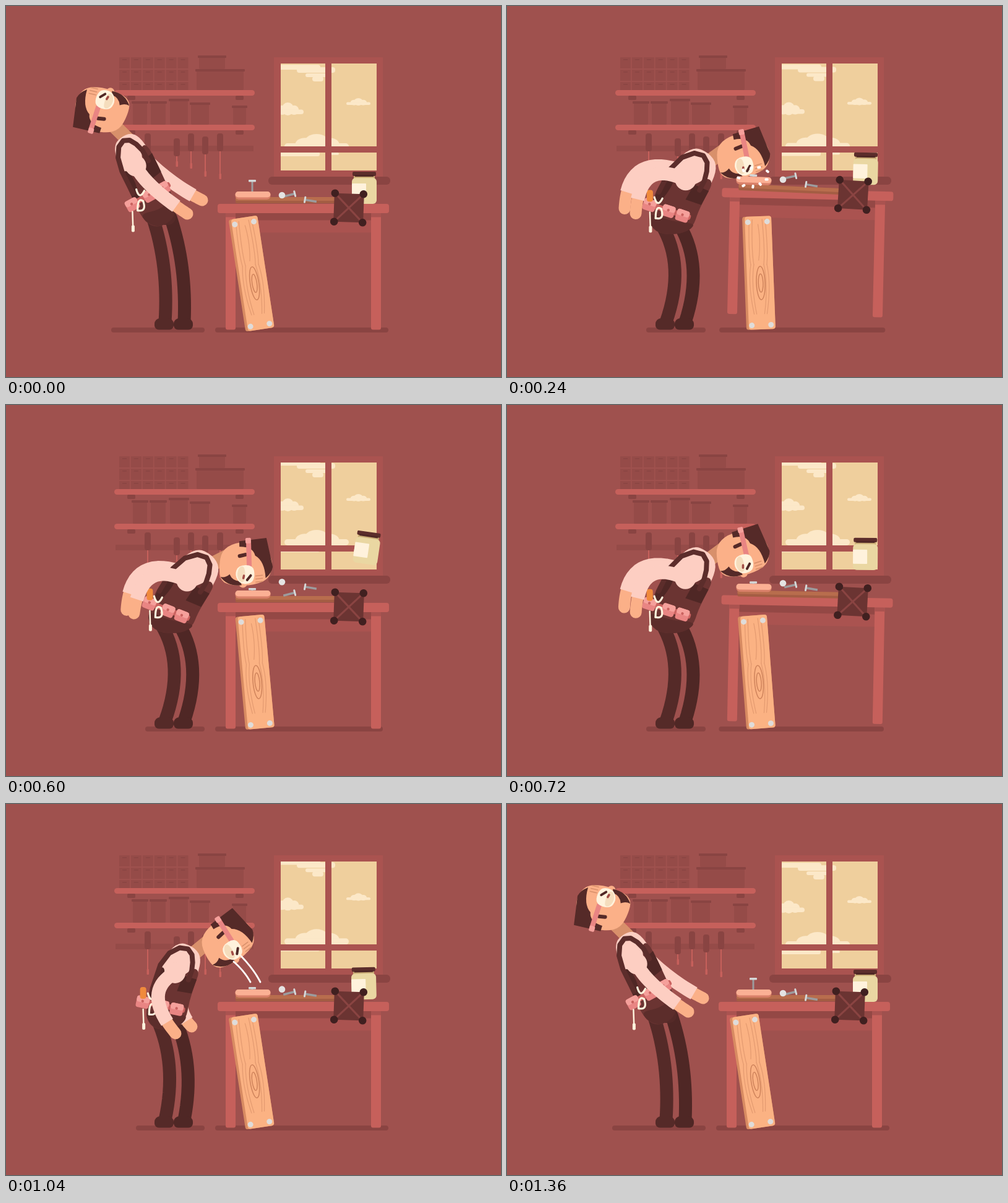
Write an HTML page with a canvas that moves like this. It is 800x600 px and loops after 1400 ms.

```html
<!DOCTYPE html>
<html lang="en">
<head>
<meta charset="utf-8">
<title>Workshop</title>
<style>
html, body { margin: 0; width: 100%; height: 100%; overflow: hidden; background: #9f514e; }
canvas { display: block; width: 800px; height: 600px; }
</style>
</head>
<body>
<canvas id="stage" width="800" height="600"></canvas>
<script>
const ctx = document.getElementById('stage').getContext('2d');
const LOOP = 1400, STEP = 40, RAD = Math.PI / 180;
const SLAM = 200, SLAM2 = 640;
const C = {
  bg: '#9f514e', dim: '#954b48', dimmer: '#894442', red: '#c6605b', rail: '#aa5350',
  shade: '#8a4442', skin: '#fbb088', tan: '#d8906b', shirt: '#fdcec2', hair: '#552a28',
  apron: '#6b3432', dark: '#4f2725', strap: '#5c2d2b', belt: '#e98583', beltHi: '#f5a09b',
  steel: '#d5d8d8', steelLow: '#9c9b9d', cream: '#fff2dc', sky: '#efcf9d', cloud: '#fce8c8'
};

// ---- drawing helpers
function box(x, y, w, h, color, r = 0) {
  ctx.fillStyle = color;
  ctx.beginPath();
  ctx.roundRect(x, y, w, h, r);
  ctx.fill();
}
function dot(x, y, r, color, ry = r) {
  ctx.fillStyle = color;
  ctx.beginPath();
  ctx.ellipse(x, y, r, ry, 0, 0, 7);
  ctx.fill();
}
function line(pts, w, color, cap = 'round') {
  ctx.strokeStyle = color;
  ctx.lineWidth = w;
  ctx.lineCap = cap;
  ctx.lineJoin = 'round';
  ctx.beginPath();
  pts.forEach(p => ctx.lineTo(...p));
  ctx.stroke();
}
function poly(pts, color) {
  ctx.fillStyle = color;
  ctx.beginPath();
  pts.forEach(p => ctx.lineTo(...p));
  ctx.fill();
}
// closed smooth shape through edge midpoints
function blob(pts, color) {
  const n = pts.length, mid = i => mix(pts[i % n], pts[(i + 1) % n], 0.5);
  ctx.fillStyle = color;
  ctx.beginPath();
  ctx.moveTo(...mid(0));
  for (let i = 1; i <= n; i++) ctx.quadraticCurveTo(...pts[i % n], ...mid(i));
  ctx.fill();
}
function path(d, color) {
  ctx.fillStyle = color;
  ctx.fill(new Path2D(d));
}
function group(x, y, deg, draw) {
  ctx.save();
  ctx.translate(x, y);
  ctx.rotate(deg * RAD);
  draw();
  ctx.restore();
}
const quad = (a, b, c, u) => (1 - u) * (1 - u) * a + 2 * u * (1 - u) * b + u * u * c;
function bend(x0, y0, x1, y1, x2, y2, from = 0, to = 1) {
  return Array.from({ length: 17 }, (_, i) => {
    const u = from + (to - from) * i / 16;
    return [quad(x0, x1, x2, u), quad(y0, y1, y2, u)];
  });
}

// ---- timing helpers
const mix = (a, b, k) => a.map((v, i) => v + (b[i] - v) * k);
const part = (t, start, dur) => Math.min(1, Math.max(0, (t - start) / dur));
const ease = (t, start, end) => { const u = part(t, start, end - start); return u * u * (3 - 2 * u); };
// rise and fall between start and start + dur; a lower skew peaks sooner
const pop = (t, start, dur, skew = 1) => { const u = part(t, start, dur) ** skew; return 4 * u * (1 - u); };

// ---- poses, in the order the body moves through them
const poses = [
  { head: [155, 168, -72], waist: [245, 328], curve: [214, 268], neck: [196, 212], girth: [1],
    belt: [230, 307, -28], near: [226, 292, 293, 336], far: [264, 288, 317, 314], hip: [237, 342], shade: [170] },
  { head: [357, 222, 58], waist: [258, 340], curve: [262, 280], neck: [303, 238], girth: [1.12],
    belt: [250, 326, 12], near: [218, 304, 274, 371], far: [268, 330, 300, 360], hip: [244, 348], shade: [210] },
  { head: [370, 217, 62], waist: [264, 345], curve: [270, 285], neck: [316, 238], girth: [1.25],
    belt: [257, 329, 12], near: [206, 242, 210, 333], far: [186, 216, 182, 321], hip: [249, 354], shade: [225] },
  { head: [390, 267, 95], waist: [265, 347], curve: [279, 295], neck: [338, 256], girth: [1.28],
    belt: [260, 332, 24], near: [222, 248, 206, 338], far: [206, 228, 198, 334], hip: [251, 355], shade: [225] }
];
// [time, position in the pose list]
const moves = [[0, 0], [80, -0.15], [120, 0.1], [160, 0.9], [SLAM, 2.8], [240, 2.5], [400, 2],
  [600, 2.8], [SLAM2, 3], [740, 2.4], [880, 3], [1040, 1], [1120, 0.22], [1200, 0.02], [1280, 0], [LOOP, 0]];

function poseAt(t) {
  const i = moves.findIndex(m => m[0] > t), [t0, a] = moves[i - 1], [t1, b] = moves[i];
  const s = a + (b - a) * ease(t, t0, t1);
  const n = Math.min(2, Math.max(0, Math.floor(s)));
  const pose = {};
  for (const k in poses[n]) pose[k] = mix(poses[n][k], poses[n + 1][k], s - n);
  pose.head[1] -= 25 * pop(s, 0, 1);
  return pose;
}

// ---- room
function drawShelves() {
  for (let r = 0; r < 3; r++) for (let c = 0; c < 6; c++) {
    const x = 183 + c * 18.9, y = 83 + r * 20;
    box(x, y, 17, r < 2 ? 18 : 13, C.dim);
    box(x + 5, y + 3, 7, 1.5, C.dimmer);
  }
  const jar = (x, y, w, floor) => {
    box(x + 1, y + 3, w - 2, floor - y - 3, C.dim, 2);
    box(x - 1, y, w + 2, 4, C.dimmer, 1);
  };
  jar(311, 80, 44, 102);
  jar(307, 102, 78, 136);
  for (const [x, y, w] of [[204, 154, 25], [233, 154, 26], [264, 150, 31], [298, 156, 31], [366, 161, 23]]) jar(x, y, w, 192);
  for (const y of [136, 192]) {
    box(196, y + 9, 13, 7, C.shade, 2);
    box(371, y + 9, 13, 7, C.shade, 2);
    box(175, y, 227, 9, C.red, 4.5);
  }
  box(177, 226, 223, 9, C.dim);
  for (const [x, y, end] of [[229, 206, 275], [276, 214, 259], [299, 206, 262], [322, 211, 275], [346, 206, 279]]) {
    line([[x, 230], [x, end]], 2, C.red);
    box(x - 1.5, end - 8, 3.5, 9, C.red, 1);
    box(x - 5, y, 10, 29, C.dimmer, 4);
  }
}
function drawWindow(dy) {
  box(433, 83, 176, 194, C.rail);
  ctx.save();
  ctx.beginPath();
  for (const [x, w] of [[444, 72], [526, 73]]) for (const [y, h] of [[93, 134], [237, 29]]) ctx.rect(x, y, w, h);
  ctx.clip();
  box(440, 90, 165, 180, C.sky);
  ctx.translate(0, dy);
  const puff = (x, base, w, h) => {
    dot(x + w * 0.5, base - h * 0.45, w * 0.19, C.cloud, h * 0.55);
    dot(x + w * 0.32, base - h * 0.35, w * 0.15, C.cloud, h * 0.4);
    dot(x + w * 0.7, base - h * 0.35, w * 0.15, C.cloud, h * 0.4);
    box(x, base - h * 0.4, w, h * 0.4, C.cloud, h * 0.2);
  };
  box(436, 95, 72, 8, C.cloud, 4);
  box(470, 99, 62, 9, C.cloud, 4);
  box(484, 109, 35, 6, C.cloud, 3);
  box(495, 114, 18, 8, C.cloud, 4);
  puff(430, 175, 51, 19);
  puff(550, 160, 39, 11);
  puff(450, 232, 104, 25);
  box(440, 236, 67, 7, C.cloud, 3);
  box(522, 237, 16, 4, C.cloud, 2);
  ctx.restore();
  box(424, 276, 197, 13, C.shade, 6);
}

// ---- bench and loose things
function drawJar(t) {
  const u = part(t, SLAM, 860);
  const tilt = 13 * Math.sin(2 * Math.PI * u ** 1.4) * (1 - u / 2);
  group(579 + tilt / 2, 295 - 66 * pop(t, SLAM, 860, 0.65), tilt, () => {
    box(-17, -21, 34, 8, '#c9ac75');
    box(-20, -17, 40, 42, '#ead7a2', 6);
    box(-20, -8, 23, 23, C.cream, 1);
    box(-19, -27, 38, 7, C.strap, 2);
    box(-15, -22, 30, 3, C.dark);
  });
}
function drawTable() {
  box(-110, 7, 220, 13, '#944845');
  box(-110, 19, 220, 20, C.rail);
  for (const x of [-125.5, 109.5]) {
    box(x, 5, 16, 191, C.red, 3);
    box(x, 7, 16, 7, C.rail);
  }
  box(-138.5, -7.5, 277, 15, C.red, 4);
}
function drawCrate() {
  box(-24, -23, 48, 46, C.apron);
  for (const s of [-1, 1]) line([[-18, -18 * s], [18, 18 * s]], 3, C.shade);
  for (const a of [-1, 1]) for (const b of [-1, 1]) dot(a * 23, b * 23, 6.3, '#402020');
}
function drawBoard() {
  box(-24, -183, 47, 183, '#d88b62', 4);
  box(-20, -183, 43, 183, '#fbb283', 4);
  const grain = '#e39a70';
  for (const s of [-1, 1]) for (const k of [8, 13]) {
    line(bend(s * k, -178, s * (k + 3), -125, s * k, -105), 1.2, grain);
    line(bend(s * k, -105, s * (k + 6), -72, s * k * 0.8, -25), 1.2, grain);
  }
  line(bend(1, -170, 5, -140, 0, -112), 1.2, grain);
  ctx.strokeStyle = '#cf835b';
  ctx.lineWidth = 1.5;
  for (const k of [1, 0.55]) {
    ctx.beginPath();
    ctx.ellipse(2, -75, 7 * k, 27 * k, 0, 0, 7);
    ctx.stroke();
  }
  for (const x of [-15, 16]) for (const y of [-174, -7]) dot(x, y, 4.5, '#dfdcda');
}
function drawNail(x, y, deg, side) {
  group(x, y, deg, () => {
    line([[-9, 0], [9, 0]], 3.5, C.steelLow, 'butt');
    line([[side * 10, -4], [side * 10, 4]], 3, C.steel);
  });
}
function drawPlank() {
  box(-80, -5, 165, 10, '#a45d43', 2);
  box(-80, -5, 165, 6, '#b86d4d', 2);
}
function drawPad(spike) {
  line([[-1, -5], [-1, -6 - spike]], 3, C.steelLow, 'butt');
  box(-7, -8 - spike, 12, 3.5, C.steel, 1);
  box(-28.5, -6, 57, 13, '#d98069', 6);
  box(-28.5, -6, 57, 9.5, '#fbb094', 5);
}
function drawSparks(t) {
  const p = (t - SLAM) / 200;
  if (p <= 0 || p > 1.3) return;
  ctx.globalAlpha = Math.min(1, 1.55 - p);
  for (let i = 0; i < 9; i++) {
    const a = i * 0.7 + 0.25, r = 16 + 26 * p + 4 * Math.sin(i * 5);
    group(399 + r * Math.cos(a), 276 + r * 0.85 * Math.sin(a), i * 50,
      () => box(-3, -2, 6, 4, p < 0.6 ? '#fff' : '#cb8c82', 1.5));
  }
  ctx.globalAlpha = 1;
}

// ---- carpenter, facing right
function drawHead() {
  dot(32, 4, 6.5, C.skin);
  blob([[-36, -20], [-35, 16], [-22, 37], [4, 42], [27, 40], [35, 20], [35, -14], [24, -41], [-10, -46]], C.skin);
  path('M34 6Q37 28 20 40Q22 32 16 25Q27 21 28 8Z', C.hair);
  path('M24 -33Q16 -43 6 -45L-41 -36L-37 8L-28 8Q-28 -14 -13 -17Q-4 -32 24 -33Z', C.hair);
  dot(-19, 0, 8, C.skin);
  line([[-15, -2], [-13, 8]], 6, C.hair);
  line([[6, -7], [-36, -7]], 8, C.belt, 'butt');
  box(-42, -11, 9, 9, C.beltHi, 2);
  for (const x of [19, 24, 29]) line([[x, -28], [x + 1, -17]], 1.6, C.tan);
  blob([[2, -13], [20, -16], [32, -10], [33, 8], [18, 17], [2, 11]], C.cream);
  blob([[4, 0], [28, 0], [30, 8], [18, 14], [4, 9]], '#f5ddbd');
  line([[19, -9], [26, -3]], 4, C.dark);
  line([[19, 2], [23, 3]], 3.5, '#a24b45');
}
function drawLeg(x, y, footX, color) {
  const bow = 26 + Math.max(0, footX - 257 ? x - 266 : x - 237);
  line(bend(x, y, x + bow, 420, footX, 511), 21, color);
  box(footX - 17, 505, 31, 18.5, color, [9, 9, 7, 7]);
}
function drawArm([x, y], arm, ball) {
  line(bend(x, y, ...arm, 0.7, 1), 19, C.skin);
  line(bend(x, y, ...arm, 0, 0.86), 22, C.shirt, 'butt');
  dot(x, y, ball, C.shirt);
}
function drawBelt(x, y, deg) {
  group(x, y, deg, () => {
    box(-38, -5, 78, 9, '#c9625f', 3);
    for (const a of [-40, -8, 16]) {
      box(a, -9, 21, 19, C.belt, 4);
      box(a, -9, 21, 10, C.beltHi, 4);
      dot(a + 10, -1, 2.2, '#c9625f');
    }
  });
  const c = Math.cos(deg * RAD), s = Math.sin(deg * RAD);
  group(x - 29 * c, y - 29 * s, 0, () => {
    if (deg > 0) box(-5, -24, 10, 19, '#f08a3c', 4);
    line([[0, 12], [1, 42]], 2.5, C.cream);
    box(-1.5, 34, 5, 11, C.cream, 2);
  });
  group(x - 14 * c, y - 14 * s, 0, () => {
    line(bend(-7, -17, -2, 1, 6, -15), 3.2, C.cream);
    line(bend(-5, 17, -5, -5, 4, 2), 3.2, C.cream);
    line(bend(-5, 17, 10, 20, 4, 2), 3.2, C.cream);
  });
}
function drawMan({ head, waist, curve, neck, girth, belt, near, far, hip }) {
  // u runs from waist to neck, v from back to chest
  const at = (u, v) => {
    const [tx, ty] = mix(curve, neck, u).map((q, i) => q - mix(waist, curve, u)[i]);
    const k = v * girth[0] / Math.hypot(tx, ty);
    return [quad(waist[0], curve[0], neck[0], u) - ty * k, quad(waist[1], curve[1], neck[1], u) + tx * k];
  };
  const on = list => list.map(q => at(...q));
  const [hx, hy] = hip;

  drawLeg(hx + 29, hy, 288, C.dark);
  drawLeg(hx, hy, 257, C.hair);
  line([[hx + 4, hy], [hx + 25, hy]], 24, C.hair);
  drawArm(at(0.74, 10), far, 11);

  const a = head[2] * RAD, c = Math.cos(a), s = Math.sin(a);
  line([[head[0] - 16 * c - 22 * s, head[1] - 16 * s + 22 * c], at(0.93, 2)], 23, C.tan);
  blob(on([[0, -27], [0.3, -28], [0.65, -29], [0.95, -26], [1.04, -6], [1.03, 12], [0.85, 24], [0.5, 28], [0, 28]]), C.shirt);
  blob(on([[-0.2, -14], [-0.08, -28], [0.2, -30], [0.5, -28], [0.56, -16], [0.5, 0], [0.62, 10],
    [0.82, 16], [0.82, 26], [0.6, 30], [0.25, 31], [-0.05, 30], [-0.2, 14]]), C.apron);
  blob(on([[0.1, -29], [0.5, -29], [0.62, -22], [0.48, -13], [0.2, -18]]), C.dark);
  blob(on([[-0.2, -14], [-0.06, -28], [0.04, -27], [-0.02, 0], [0.02, 30], [-0.08, 29], [-0.2, 14]]), C.strap);
  poly(on([[0.36, 10], [0.62, 9], [0.68, 29], [0.4, 31]]), C.dark);
  line(on([[0.3, -25], [0.6, -27], [0.78, -25], [0.91, -18], [0.97, -8], [0.95, 2], [0.87, 10], [0.76, 16], [0.6, 19]]), 8, C.strap);

  drawBelt(...belt);
  drawArm(at(0.6, -3), near, 17);
  group(...head, drawHead);
}

function render(t) {
  const pose = poseAt(t);
  const tilt = pop(t, SLAM, 360) + 0.35 * pop(t, SLAM2, 200) - 0.37 * pop(t, 840, 120);
  const lift = 29 * (pop(t, SLAM, 360, 0.6) + 0.35 * pop(t, SLAM2, 200, 0.6) + 0.12 * pop(t, 840, 120));
  const hop = pop(t, SLAM, 380, 0.8) + 0.25 * pop(t, SLAM2, 200, 0.8);
  const fly = pop(t, SLAM, 460, 0.8) + 0.45 * pop(t, SLAM2, 440, 0.8);
  const lean = -8.7 + 9.3 * pop(t, SLAM, 480, 0.6) + 4.5 * pop(t, SLAM2, 400, 0.6);
  const spike = 17 - 15 * (ease(t, 160, SLAM) - ease(t, 1080, 1180));

  box(0, 0, 800, 600, C.bg);
  drawShelves();
  drawWindow(-5 * (ease(t, 160, 560) - ease(t, 1000, 1240)));
  const left = 338 + Math.max(0, 13 * tilt), right = 618 - 9 * (ease(t, SLAM, 260) - ease(t, 980, 1040));
  box(left, 520, right - left, 8, C.shade, 4);
  box(pose.shade[0], 520, 321 - pose.shade[0], 8, C.shade, 4);

  const bench = draw => group(480.5 + 13.6 * tilt, 327.5 - lift, 3.3 * tilt, draw);
  bench(drawTable);
  drawJar(t);
  group(451 + 6 * hop, 314 - 32 * hop, 4.5 * hop, drawPlank);
  drawNail(457, 306 - 53 * hop, -14 + 3 * hop, 1);
  dot(446, 306 - 52 * fly, 5.3, '#e4e3e2');
  drawNail(493, 315 - 51 * fly, 10, -1);
  bench(() => group(73.5, -1, 2, drawCrate));
  group(411, 523, lean, drawBoard);
  drawMan(pose);
  group(399, 306 - 43 * hop, 3 * hop, () => drawPad(spike));
  if (t >= 1000 && t < 1080) {
    const [x, y] = pose.head;
    line(bend(x + 11, y + 33, 386, 271, 395, 288), 2.8, '#fff');
    line(bend(x + 23, y + 24, 401, 268, 411, 288), 2.8, '#fff');
  }
  drawSparks(t);
}

function frame() {
  const t = performance.now() % LOOP;
  render(Math.floor(t / STEP) * STEP);
  requestAnimationFrame(frame);
}
frame();
</script>
</body>
</html>
```
